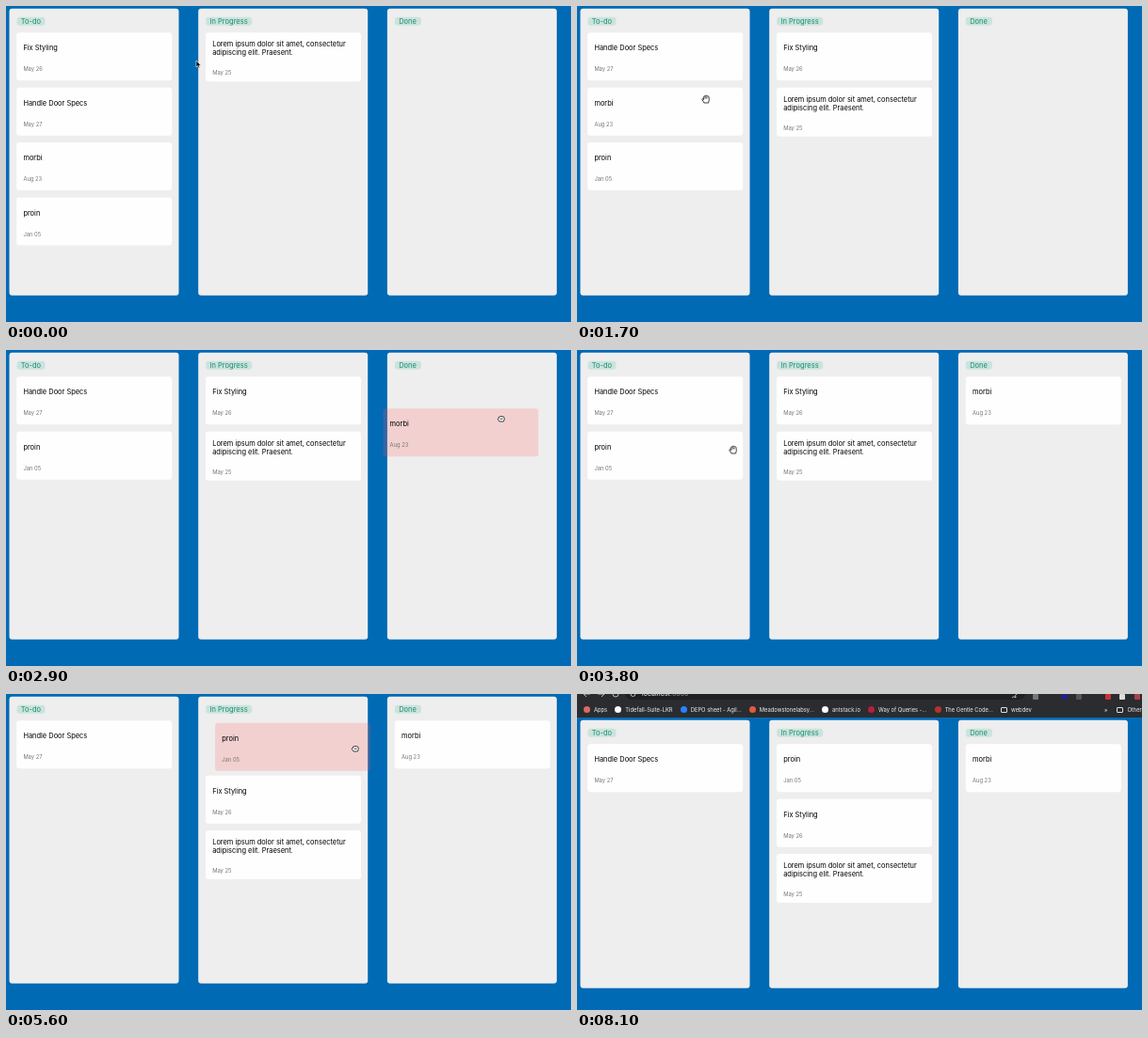
These frames come from a looping animation (600 by 336 pixels, 8400 ms). An HTML page:

```html
<!DOCTYPE html>
<html lang="en">
<head>
<meta charset="utf-8">
<title>Task board</title>
<style>
  html, body { margin: 0; width: 100%; height: 100%; overflow: hidden; background: #006ab5; }
  body { position: relative; font-family: Inter, sans-serif; white-space: nowrap; }
  #board, #bar, #url, .row, .column, .card, .card div, .label, svg { position: absolute; left: 0; top: 0; }
  .column { width: 180px; height: 305px; border-radius: 3px; background: #eee; }
  .label { left: 7.8px; top: 8.700px; padding: 0 4.500px; border-radius: 3px; background: #cae4dc; color: #1b8b74; font-size: 7.500px; line-height: 9.800px; }
  .card { width: 165px; height: 51.300px; border-radius: 3px; background: #fefefe; }
  .card.active { background: rgba(255, 88, 84, .2); z-index: 1; }
  .card .title { left: 7.200px; top: 13.300px; font-size: 7.450px; line-height: 8.600px; color: #000; }
  .card .date { left: 7.200px; top: 34.800px; font-size: 5.800px; line-height: 8px; color: #777; }
  .tall { height: 52px; }
  .card.tall .title { top: 9px; }
  .card.tall .date { top: 39.400px; }
  #bar { width: 600px; height: 25px; overflow: hidden; background: #2b2c2f; color: #eee; font-size: 5.800px; line-height: 8px; z-index: 2; }
  #url { left: 51px; top: -8px; width: 425px; height: 14px; border-radius: 7px; background: #1f2023; font-size: 7px; line-height: 16px; text-indent: 18px; }
  #url i { font-style: normal; color: #999; }
  .row { display: flex; align-items: center; }
  #links { left: 7px; top: 12.800px; gap: 8.200px; }
  #more { left: 560px; top: 12.800px; gap: 10px; }
  .row span { display: flex; align-items: center; gap: 4px; }
  .row b { width: 7px; height: 7px; border-radius: 50%; }
  .row b.folder { box-sizing: border-box; height: 6px; border: .8px solid #ddd; border-radius: 1px; }
  #tools { left: 484px; gap: 9.400px; }
  #tools b { width: 6px; height: 6px; border-radius: 1px; }
  svg { z-index: 3; }
</style>
</head>
<body>
<div id="board"></div>
<div id="bar">
  <div id="url">localhost<i>:3000</i></div>
  <div id="links" class="row"></div>
  <div id="more" class="row"><span>»</span><span><b class="folder"></b>Other Bookmarks</span></div>
  <div id="tools" class="row"></div>
  <svg width="600" height="25" fill="none" stroke="#ddd" stroke-width=".8">
    <path d="M7 0H14M7 0l3 3M22 0h7l-3 3M38 0a3 3 0 0 0 6 0M57 0a2.500 2.500 0 0 0 5 0M462 4l2-1.300 2 1.300-.5-2.400 1.500-1.600"/>
  </svg>
</div>
<svg width="600" height="336"><path id="cursor"/></svg>
<script>
const LOOP = 8400, STEP = 100, SHIFT = 200, DROP = 300, LAG = 20;
const $ = id => document.getElementById(id);

function add(parent, tag, className, html = '') {
  const el = document.createElement(tag);
  el.className = className;
  el.innerHTML = html;
  return parent.appendChild(el);
}

const columns = ['To-do', 'In Progress', 'Done'].map(name =>
  add($('board'), 'div', 'column', `<span class="label">${name}</span>`));

const cards = [
  ['Fix Styling', 'May 26'], ['Handle Door Specs', 'May 27'], ['morbi', 'Aug 23'], ['proin', 'Jan 05'],
  ['Lorem ipsum dolor sit amet, consectetur<br>adipiscing elit. Praesent.', 'May 25']
].map(([title, date]) => add($('board'), 'div', title.includes('<br>') ? 'card tall' : 'card',
  `<div class="title">${title}</div><div class="date">${date}</div>`));

const links = { 'Apps': '#d96b5f', 'Tidefall-Suite-LKR': '#fff', 'DEPO sheet - Agil...': '#2684ff',
  'Meadowstonelabsy...': '#df5b3e', 'antstack.io': '#fff', 'Way of Queries -...': '#b51f3c',
  'The Gentle Code...': '#b3332d', 'webdev': '' };
for (const [label, color] of Object.entries(links))
  add($('links'), 'span', '', `<b class="${color ? '' : 'folder'}" style="background:${color}"></b>${label}`);
for (const color of ['#777', '', '#22208c', '#555', '', '#c8323a', '#ddd', '#a8434a'])
  add($('tools'), 'b', '').style.background = color;

// Each drag takes a card to the top of a column; the other cards make room at `shift`.
const drags = [
  { id: 0, column: 1, grab: 500, shift: 693, drop: 1000 },
  { id: 2, column: 2, grab: 2000, shift: 2450, drop: 3000 },
  { id: 3, column: 1, grab: 4000, shift: 5100, drop: 5500 }
];
const layouts = [[[0, 1, 2, 3], [4], []]];
for (const { id, column } of drags) {
  const next = layouts[layouts.length - 1].map(list => list.filter(other => other !== id));
  next[column].unshift(id);
  layouts.push(next);
}

// Pointer path: time, x, y.
const pointer = [
  [0, 202, 58], [300, 157, 58], [500, 157, 58], [700, 288, 65], [1000, 376, 62],
  [1700, 137, 99], [2000, 128, 98], [2900, 526, 73], [3000, 541, 71],
  [3800, 166, 106], [4000, 166, 106], [4400, 606, 289], [4800, 183, 92], [4900, 283, 92],
  [5500, 405, 55], [5600, 371, 58], [7500, 371, 54], [7800, 380, -10], [LOOP, 380, -10]
];

const shapes = {
  arrow: 'M0 0V7L1.600 5.600L2.700 8L3.900 7.500L2.800 5.200H5Z',
  open: 'M-2 4L-4 .8Q-4.600-.6-3.300-.3L-2.400.6V-2.600Q-1.700-3.800-1-2.600Q-.8-4.600.2-3.600Q1-4.400 1.600-3.200Q2.700-3.600 3-2.200Q3.800.6 2.600 4ZM-.8-2.600V-.4M.9-2.800V-.4',
  closed: 'M-2 3L-3.600.8Q-3.900-.6-2.600-.6Q-2.800-2.600-1.200-2.200Q0-3.200 1-2.200Q3-2.600 3.200-.6Q3.400 1.400 2.400 3ZM-1.500.2H1.500'
};

const clamp = u => Math.max(0, Math.min(1, u));
const easeOut = u => 1 - (1 - clamp(u)) ** 3;
const mix = (a, b, u) => a.map((v, i) => v + (b[i] - v) * u);
const move = (el, x, y) => { el.style.transform = `translate(${x}px, ${y}px)`; };

function slot(layout, id) {
  const column = layout.findIndex(list => list.includes(id));
  return [11.2 + 200.8 * column, 28.3 + 58.4 * layout[column].indexOf(id)];
}

function pointerAt(t) {
  const next = pointer.findIndex(key => key[0] > t);
  const a = pointer[next - 1], b = pointer[next];
  return mix(a, b, (t - a[0]) / (b[0] - a[0])).slice(1);
}

function locate(id, t) {
  let pos = slot(layouts[0], id), active = false;
  drags.forEach((drag, i) => {
    if (t < drag.grab) return;
    const held = drag.id === id;
    if (held) {
      // A held card trails slightly behind the pointer.
      const from = pointerAt(drag.grab);
      const to = pointerAt(Math.max(drag.grab, Math.min(t, drag.drop) - LAG));
      pos = pos.map((v, k) => v + to[k] - from[k]);
      active = t < drag.drop + DROP;
    }
    const progress = held ? (t - drag.drop) / DROP : (t - drag.shift) / SHIFT;
    pos = mix(pos, slot(layouts[i + 1], id), easeOut(progress));
  });
  return { pos, active };
}

function draw(now) {
  const t = Math.floor(now % LOOP / STEP) * STEP;
  const [px, py] = pointerAt(t);
  let shape = 'arrow';
  cards.forEach((el, id) => {
    const { pos: [x, y], active } = locate(id, t);
    move(el, x, y);
    el.classList.toggle('active', active);
    if (active) shape = 'closed';
    else if (shape === 'arrow' && px > x && px < x + 165 && py > y && py < y + 51) shape = 'open';
  });
  const arrow = shape === 'arrow';
  const look = { d: shapes[shape], transform: `translate(${px} ${py})`, fill: arrow ? '#000' : '#fff',
    stroke: arrow ? '#fff' : '#111', 'stroke-width': arrow ? .6 : .8 };
  for (const name in look) $('cursor').setAttribute(name, look[name]);

  const reveal = clamp((t - 7700) / 400);
  move($('bar'), 0, 25 * reveal - 25);
  move($('board'), 0, 25 * reveal);
  columns.forEach((el, i) => {
    move(el, 3.5 + 200.7 * i, 2.8);
    el.style.height = 305 - 20 * reveal + 'px';
  });
  requestAnimationFrame(draw);
}
requestAnimationFrame(draw);
</script>
</body>
</html>
```
